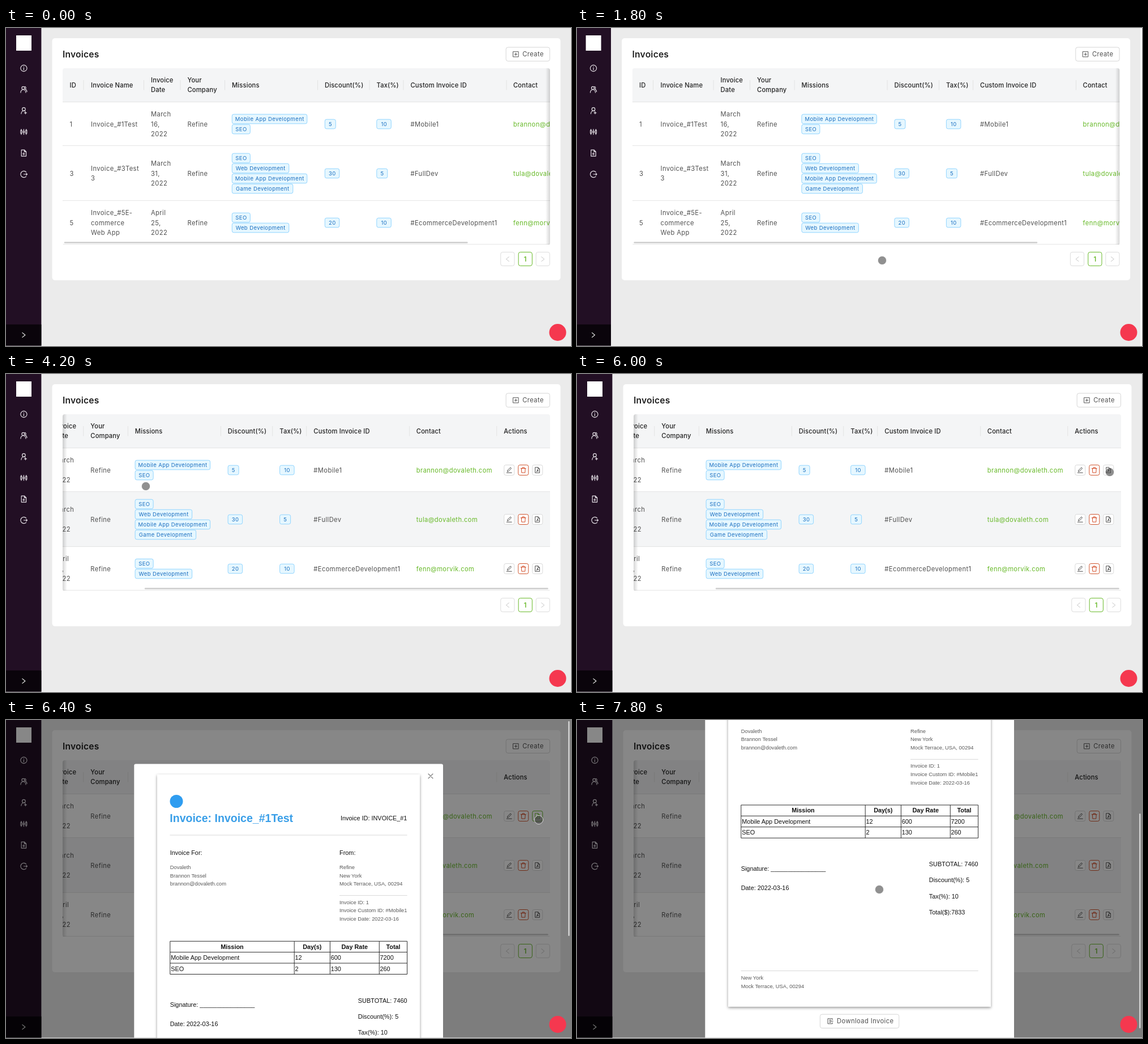
These frames come from a looping animation (998x561 px, 8 s). An HTML page:

```html
<!DOCTYPE html>
<html lang="en">
<head>
<meta charset="utf-8">
<title>Invoices</title>
<style>
html, body { margin: 0; width: 100%; height: 100%; overflow: hidden; background: #fff; }
svg { display: block; width: 100%; height: 100%; }
text { font: 11.2px Inter, sans-serif; letter-spacing: .4px; fill: #505050; white-space: pre; }
.title { font-size: 15.6px; font-weight: 600; letter-spacing: .2px; fill: #1f1f1f; }
.head { font-weight: 500; letter-spacing: .15px; fill: #222; }
.link { fill: #67b928; }
.tag { font-size: 9.5px; letter-spacing: .4px; fill: #1a6fc0; text-anchor: middle; }
.page { fill: #67b928; font-weight: 600; text-anchor: middle; letter-spacing: 0; }
.doc text { font: 10.9px "Liberation Sans", Arial, sans-serif; letter-spacing: 0; fill: #111; }
.doc .small { font-size: 9.36px; fill: #595959; }
.doc .name { font-size: 19.55px; font-weight: 700; fill: #3a9fe8; }
.doc .th { font-weight: 700; text-anchor: middle; }
.icon { fill: none; stroke-linecap: round; stroke-linejoin: round; }
</style>
</head>
<body>
<svg id="stage" viewBox="0 0 998 561" preserveAspectRatio="none"></svg>
<script>
const GREEN = '#67b928';
const text = (x, y, str, cls = '') => `<text x="${x}" y="${y}" dy=".36em" class="${cls}">${str}</text>`;
const lines = (x, y, strs, cls) =>
  strs.map((s, i) => text(x, y + (i - (strs.length - 1) / 2) * 17.2, s, cls)).join('');
const box = (x, y, w, h, fill, stroke = 'none', r = 0, extra = '') =>
  `<rect x="${x}" y="${y}" width="${w}" height="${h}" rx="${r}" fill="${fill}" stroke="${stroke}" ${extra}/>`;
const icon = (x, y, d, color, width = 1) =>
  `<path class="icon" transform="translate(${x} ${y})" d="${d}" stroke="${color}" stroke-width="${width}"/>`;
const ring = (x, y, r) => `M${x - r} ${y}a${r} ${r} 0 1 0 ${2 * r} 0a${r} ${r} 0 1 0 ${-2 * r} 0`;

const ICONS = {
  info: ring(0, 0, 5.6) + 'M0-.8V3M0-3v.4',
  team: ring(-1, -2.5, 2.5) + 'M-5.5 5.5c0-3 2-5.3 4.5-5.3s4.5 2.3 4.5 5.3M2-5a2.5 2.5 0 0 1 .5 4.6c2 .6 3 2 3 4.4',
  addUser: ring(0, -2.6, 2.8) + 'M-4.5 5.5c0-3 2-5.2 4.5-5.2q1.2 0 2 .5M3 1.8v4M1 3.8h4',
  sliders: ring(0, 0, 1.4) + 'M0-4.6v3.2M0 1.4v3.2M-5.4-2.8h2v5.6h-2zM3.4-2.8h2v5.6h-2zM-4.4-4.6v1.8M-4.4 2.8v1.8M4.4-4.6v1.8M4.4 2.8v1.8',
  addFile: 'M-4.2-5.5H1.2L4.2-2.5V5.5H-4.2ZM1-5.5v3.2h3.2M0-.6v4M-2 1.4h4',
  logout: 'M4.2-3.8A5.6 5.6 0 1 0 4.2 3.8M0 0H6M4.4-1.7L6 0L4.4 1.7',
  edit: 'M-4.5 4.7h9M-3.2 2.3l.4-2L2.3-4.6l1.6 1.6L-1.2 2z',
  trash: 'M-4.5-2.8h9M-1.7-2.8V-4.6H1.7v1.8M-3.4-2.8L-3 4.6H3L3.4-2.8',
  pdf: 'M-3.7-4.8H1L3.7-2.1V4.8H-3.7ZM1-4.8v2.7h2.7M-1.6 2.6Q.3 1 .1-1Q.2 1 1.9 1.6Q0 1-1.6 2.6',
  plus: 'M-4.6-4.6h9.2v9.2h-9.2zM-2.2 0h4.4M0-2.2v4.4',
  save: 'M4-2.5V-4.5H-4.2V4.5H4V2.5M-1 0H5M-1.5-2H1.5M-1.5 2H1.5',
  right: 'M-2.5-4L2.5 0L-2.5 4',
  left: 'M2.5-4L-2.5 0L2.5 4',
  close: 'M-4-4L4 4M4-4L-4 4'
};

const TAG_WIDTH = { 'Mobile App Development': 132.5, 'SEO': 32, 'Web Development': 100.5, 'Game Development': 107.5 };
const tag = (x, y, label) => {
  const w = TAG_WIDTH[label] || (label.length > 1 ? 25.5 : 19);
  return box(x + .3, y - 8.3, w, 16.6, '#e6f7ff', '#91d5ff', 3) + text(x + w / 2 + .5, y, label, 'tag');
};

const COLUMNS = [
  [112.5, 'ID'], [150, 'Invoice Name'], [256, 'Invoice', 'Date'], [320.5, 'Your', 'Company'], [399, 'Missions'],
  [563, 'Discount(%)'], [654.5, 'Tax(%)'], [714.5, 'Custom Invoice ID'], [896, 'Contact'], [1050.5, 'Actions']
];
const ROWS = [
  { top: 131, height: 77, id: '1', name: ['Invoice_#1Test'], date: ['March', '16,', '2022'],
    missions: ['Mobile App Development', 'SEO'], discount: '5', tax: '10', custom: '#Mobile1', mail: 'brannon@dovaleth.com' },
  { top: 208, height: 97, id: '3', name: ['Invoice_#3Test', '3'], date: ['March', '31,', '2022'],
    missions: ['SEO', 'Web Development', 'Mobile App Development', 'Game Development'],
    discount: '30', tax: '5', custom: '#FullDev', mail: 'tula@dovaleth.com' },
  { top: 305, height: 77, id: '5', name: ['Invoice_#5E-', 'commerce', 'Web App'], date: ['April', '25,', '2022'],
    missions: ['SEO', 'Web Development'], discount: '20', tax: '10', custom: '#EcommerceDevelopment1', mail: 'fenn@morvik.com' }
];

const action = (x, y, name, border, color) =>
  box(x - 9, y - 9, 18, 18, '#fff', border, 3) + icon(x, y, ICONS[name], color, .95);

function row(r) {
  const y = r.top + r.height / 2, x = COLUMNS.map(c => c[0]);
  return text(x[0], y, r.id) + lines(x[1], y, r.name) + lines(x[2], y, r.date) + text(x[3], y, 'Refine') +
    r.missions.map((m, i) => tag(x[4], y + (i - (r.missions.length - 1) / 2) * 18, m)).join('') +
    tag(x[5], y, r.discount) + tag(x[6], y, r.tax) + text(x[7], y, r.custom) + text(x[8], y, r.mail, 'link') +
    action(1060, y, 'edit', '#d9d9d9', '#444') + action(1085, y, 'trash', '#d0562f', '#d0431c') +
    action(1110, y, 'pdf', '#d9d9d9', '#444');
}

const table = `
  <g clip-path="url(#tableClip)">
    ${box(100, 71, 861, 60, '#f4f5f6')}
    ${box(100, 208, 861, 97, '#f4f5f6', 'none', 0, 'id="hover"')}
    ${[131, 208, 305, 382].map(y => box(100, y - .9, 861, .9, '#e2e2e2')).join('')}
    <g id="cells">
      ${[137, 243.5, 308, 386.5, 550.5, 642, 702, 884, 1038].map(x => box(x - .4, 92, .8, 17.5, '#dedede')).join('')}
      ${COLUMNS.map(([x, ...label]) => lines(x, 100.7, label, 'head')).join('')}
      ${ROWS.map(row).join('')}
      <g id="focus">${action(1110, 169.5, 'pdf', GREEN, GREEN)}</g>
    </g>
    ${box(100, 71, 8, 311, 'url(#shadeLeft)', 'none', 0, 'id="leftShade"')}
    ${box(953, 71, 8, 311, 'url(#shadeRight)', 'none', 0, 'id="rightShade"')}
    ${box(102.7, 377.2, 713, 2.6, '#cdcdcd', 'none', 1.3, 'id="thumb"')}
  </g>`;

const page = `
  <g id="page">
    ${box(0, 0, 998, 560.4, '#ebebeb')}
    ${box(0, 0, 62.4, 560.4, '#220f24')}${box(0, 523, 62.4, 37.4, '#0a040b')}
    ${box(18, 13, 27, 27, '#fff')}
    ${['info', 'team', 'addUser', 'sliders', 'addFile', 'logout']
      .map((n, i) => icon(31.4, 71 + i * 37.4, ICONS[n], '#eae6eb', 1.15)).join('')}
    ${icon(31.4, 541.6, ICONS.right, '#fff', 1.15)}
    ${box(81.5, 18, 898, 427, '#fff', 'none', 5)}
    ${text(100, 46.3, 'Invoices', 'title')}
    ${box(883.2, 34, 77.3, 24.4, '#fff', '#d6d6d6', 3.5)}
    ${icon(900.6, 46.3, ICONS.plus, '#555')}${text(912.3, 46.3, 'Create')}
    ${table}
    ${[[873.8, '#dcdcdc'], [905.2, GREEN], [936.2, '#dcdcdc']].map(([x, c]) => box(x, 395.4, 24.2, 24.2, '#fff', c, 3.5)).join('')}
    ${icon(886, 407.7, ICONS.left, '#c6c6c6')}${text(917.2, 407.7, '1', 'page')}${icon(948.3, 407.7, ICONS.right, '#c6c6c6')}
  </g>`;

const ADDRESS = 'Mock Terrace, USA, 00294';
const rule = (x, y, x2) => box(x, y - .4, x2 - x, .9, '#d4d4d4');
const small = (x, y, strs) => strs.map((s, i) => text(x, y + i * 14.8, s, 'small')).join('');
const gridRow = (y, cells) => cells.map((c, i) => text([291.3, 510.5, 573.7, 660.5][i], y, c)).join('');
const modal = `
  <g id="scroll"><g id="modal">
    ${box(226.3, 77.5, 545.7, 726, '#fff', 'none', 3)}
    ${icon(750, 99, ICONS.close, '#777', 1.1)}
    ${box(267, 96, 464, 650, '#fff', 'none', 0, 'filter="url(#paperShadow)"')}
    <g class="doc">
      <circle cx="301" cy="143.5" r="11.5" fill="#2f9df0"/>
      ${text(289.3, 172.6, 'Invoice: Invoice_#1Test', 'name')}
      ${text(591, 172.6, 'Invoice ID: INVOICE_#1')}
      ${rule(289.5, 203, 708.7)}
      ${text(289.7, 234, 'Invoice For:')}${text(589, 234, 'From:')}
      ${small(289.7, 259.5, ['Dovaleth', 'Brannon Tessel', 'brannon@dovaleth.com'])}
      ${small(589, 259.5, ['Refine', 'New York', ADDRESS])}
      ${rule(589, 309.6, 708.7)}
      ${small(589, 321.2, ['Invoice ID: 1', 'Invoice Custom ID: #Mobile1', 'Invoice Date: 2022-03-16'])}
      <path d="M289.8 390.3H708.6V448.5H289.8ZM289.8 409.6H708.6M289.8 429H708.6M509.2 390.3V448.5M572.4 390.3V448.5M659.3 390.3V448.5" fill="none" stroke="#222" stroke-width=".95"/>
      ${[[399.5, 'Mission'], [540.8, 'Day(s)'], [615.8, 'Day Rate'], [684, 'Total']].map(([x, s]) => text(x, 399.8, s, 'th')).join('')}
      ${gridRow(419.3, ['Mobile App Development', '12', '600', '7200'])}
      ${gridRow(438.7, ['SEO', '2', '130', '260'])}
      ${text(289.7, 502.3, 'Signature: ________________')}
      ${text(289.7, 536.4, 'Date: 2022-03-16')}
      ${['SUBTOTAL: 7460', 'Discount(%): 5', 'Tax(%): 10', 'Total($):7833'].map((s, i) => text(621.8, 494.7 + i * 28.1, s)).join('')}
      ${rule(289.5, 682.8, 708.7)}
      ${small(289.7, 695.2, ['New York', ADDRESS])}
    </g>
    ${box(429.4, 759.5, 139.4, 24.4, '#fff', '#d6d6d6', 3.5)}
    ${icon(447.2, 771.6, ICONS.save, '#555')}${text(459, 771.6, 'Download Invoice')}
  </g></g>`;

const shade = (id, from, to) => `<linearGradient id="${id}">
  <stop stop-opacity="${from}"/><stop offset="1" stop-opacity="${to}"/></linearGradient>`;

document.getElementById('stage').innerHTML = `
  <defs>
    ${shade('shadeLeft', .16, 0)}${shade('shadeRight', 0, .16)}
    <clipPath id="tableClip">${box(100, 71, 861, 312, '#000', 'none', 4)}</clipPath>
    <clipPath id="view">${box(0, 0, 998, 560.4, '#000')}</clipPath>
    <filter id="paperShadow" x="-5%" y="-5%" width="110%" height="110%">
      <feDropShadow dx="0" dy="2" stdDeviation="2.6" flood-opacity=".42"/>
    </filter>
  </defs>
  ${page}
  ${box(0, 0, 998, 560.4, '#000', 'none', 0, 'id="dim"')}
  <g clip-path="url(#view)">${modal}</g>
  ${box(993, 2, 2.6, 379, '#cfcfcf', 'none', 1.3, 'id="pageThumb"')}
  <circle cx="974.5" cy="537" r="15" fill="#f5384f"/>
  <circle id="cursor" r="7.6" fill="#3c3c3c" fill-opacity=".57" stroke="#fff" stroke-opacity=".7"/>`;

const el = Object.fromEntries([...document.querySelectorAll('[id]')].map(e => [e.id, e]));
const move = (e, x, y) => e.setAttribute('transform', `translate(${x} ${y})`);
const opacity = (e, v) => e.setAttribute('opacity', v);

// Eased value between [time, value] keys.
function track(keys, t) {
  const next = keys.findIndex(k => k[0] > t);
  if (next < 0) return keys[keys.length - 1][1];
  if (next === 0) return keys[0][1];
  const [t0, a] = keys[next - 1], [t1, b] = keys[next];
  const p = (t - t0) / (t1 - t0);
  return a + (b - a) * p * p * (3 - 2 * p);
}

// Scrolling starts fast and coasts to a stop.
function coast(t, from, to, distance) {
  const p = Math.min(1, Math.max(0, (t - from) / (to - from)));
  return distance * (1 - (1 - p) ** 2);
}

const POINTER = [
  [200, 600, 432], [1200, 539, 410], [1850, 539, 410], [2200, 478, 298], [2600, 466, 364], [3400, 375, 364],
  [3650, 375, 364], [4200, 247, 198], [4700, 250, 184], [5050, 234, 188], [5800, 944, 172], [6000, 941, 173],
  [6200, 941, 176], [6500, 941, 176], [7100, 534, 299]
];
const POINTER_X = POINTER.map(([t, x]) => [t, x]);
const POINTER_Y = POINTER.map(([t, , y]) => [t, y]);

function draw(t) {
  const shift = track([[1350, 0], [1600, -2.4], [1950, -2.4], [2200, 0]], t);
  const tableScroll = coast(t, 2200, 3245, 171.2);
  const open = track([[6080, 0], [6360, 1]], t);
  const modalScroll = track([[7050, 0], [7800, 240.3]], t);

  move(el.page, shift, 0);
  move(el.cells, -tableScroll, 0);
  move(el.thumb, tableScroll * .83, 0);
  opacity(el.leftShade, tableScroll > 0 ? 1 : 0);
  opacity(el.rightShade, tableScroll < 170.5 ? 1 : 0);
  opacity(el.hover, t >= 2150 ? 1 : 0);
  opacity(el.focus, t >= 6100 && t < 6600 ? 1 : 0);

  opacity(el.dim, open * .47);
  opacity(el.modal, open);
  const scale = .2 + .8 * open;
  el.modal.setAttribute('transform', `translate(941 175) scale(${scale}) translate(-941 -175)`);
  move(el.scroll, 0, -modalScroll);
  opacity(el.pageThumb, open);
  move(el.pageThumb, 0, modalScroll * .678);

  opacity(el.cursor, track([[200, 0], [400, 1]], t));
  move(el.cursor, track(POINTER_X, t), track(POINTER_Y, t));
}

const start = performance.now();
function tick() {
  draw((performance.now() - start) % 8000);
  requestAnimationFrame(tick);
}
draw(0);
requestAnimationFrame(tick);
</script>
</body>
</html>
```
